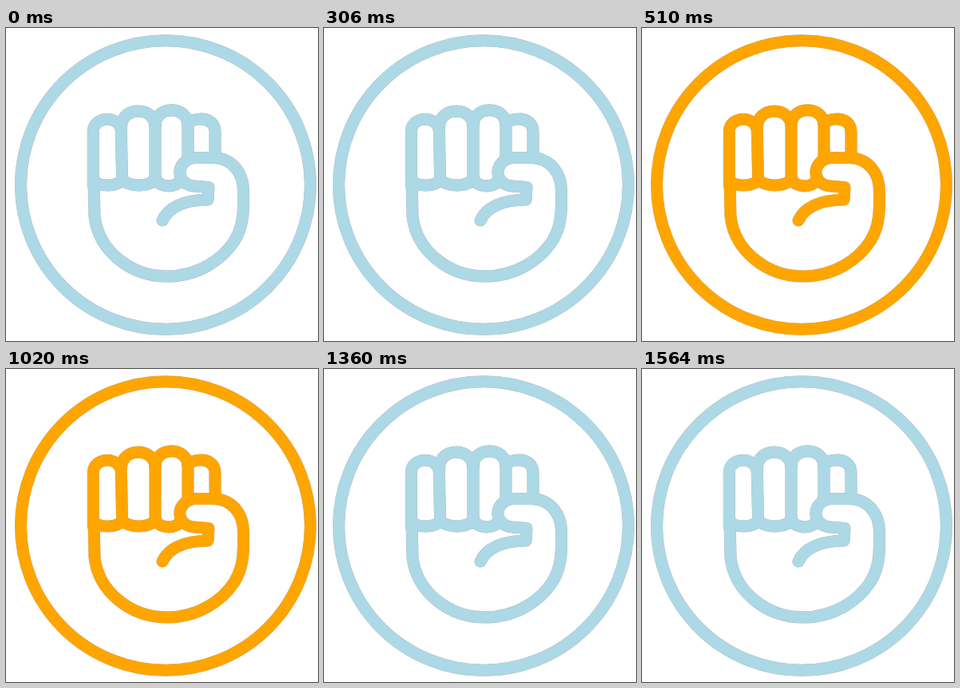
An HTML page that plays this animation: 391 by 392 pixels, repeating every 1.7 s.

```html
<!DOCTYPE html>
<html lang="en">
<head>
<meta charset="utf-8">
<title>Raised fist</title>
<style>
  html, body { margin: 0; width: 100%; height: 100%; overflow: hidden; background: #fff; }
  svg { display: block; width: 100vw; height: 100vh; }
  #icon { fill: none; stroke-linecap: round; stroke-linejoin: round; }
</style>
</head>
<body>
<svg viewBox="0 0 391 392">
  <defs>
    <g id="icon">
      <ellipse cx="200" cy="196.5" rx="181.5" ry="180.8"/>
      <!-- fingers -->
      <path d="M109.3 197V130C109.3 109 144.3 109 144.3 130L145.6 189C143 199.500 112 199.500 110.500 190"/>
      <path d="M144.500 124C144.500 97.500 187 97.500 187 124V188C183 200 150 200 145.600 188"/>
      <path d="M187 122C187 96.500 228 96.500 228 122V162M187 188C190 196 199 199 208 197.500C213 196.500 217 194 219 190"/>
      <path d="M228 120C233 112 262 109 262 130V162"/>
      <!-- palm and thumb -->
      <path d="M110 190L111 236C116 279 156 311 202 311C241 311 271 290 286 267C295 253 297.500 239 297.500 222V204C297.500 181 283 163 260 162.500H235C212 167 212 196 236 198L254 199.500L253 215C222 215.500 204 224 196 241"/>
    </g>
  </defs>
  <use href="#icon" stroke="#222" stroke-opacity=".35" stroke-width="15.1"/>
  <use id="line" href="#icon" stroke="#add8e6" stroke-width="14.6"/>
</svg>
<script>
  const LOOP = 1700, WARM_FROM = 510, WARM_TO = 1360;
  const line = document.getElementById("line");

  function draw(ms) {
    const t = ms % LOOP;
    const warm = t >= WARM_FROM && t < WARM_TO;
    line.setAttribute("stroke", warm ? "#ffa500" : "#add8e6");
  }

  function tick() {
    draw(performance.now());
    requestAnimationFrame(tick);
  }
  tick();
</script>
</body>
</html>
```
